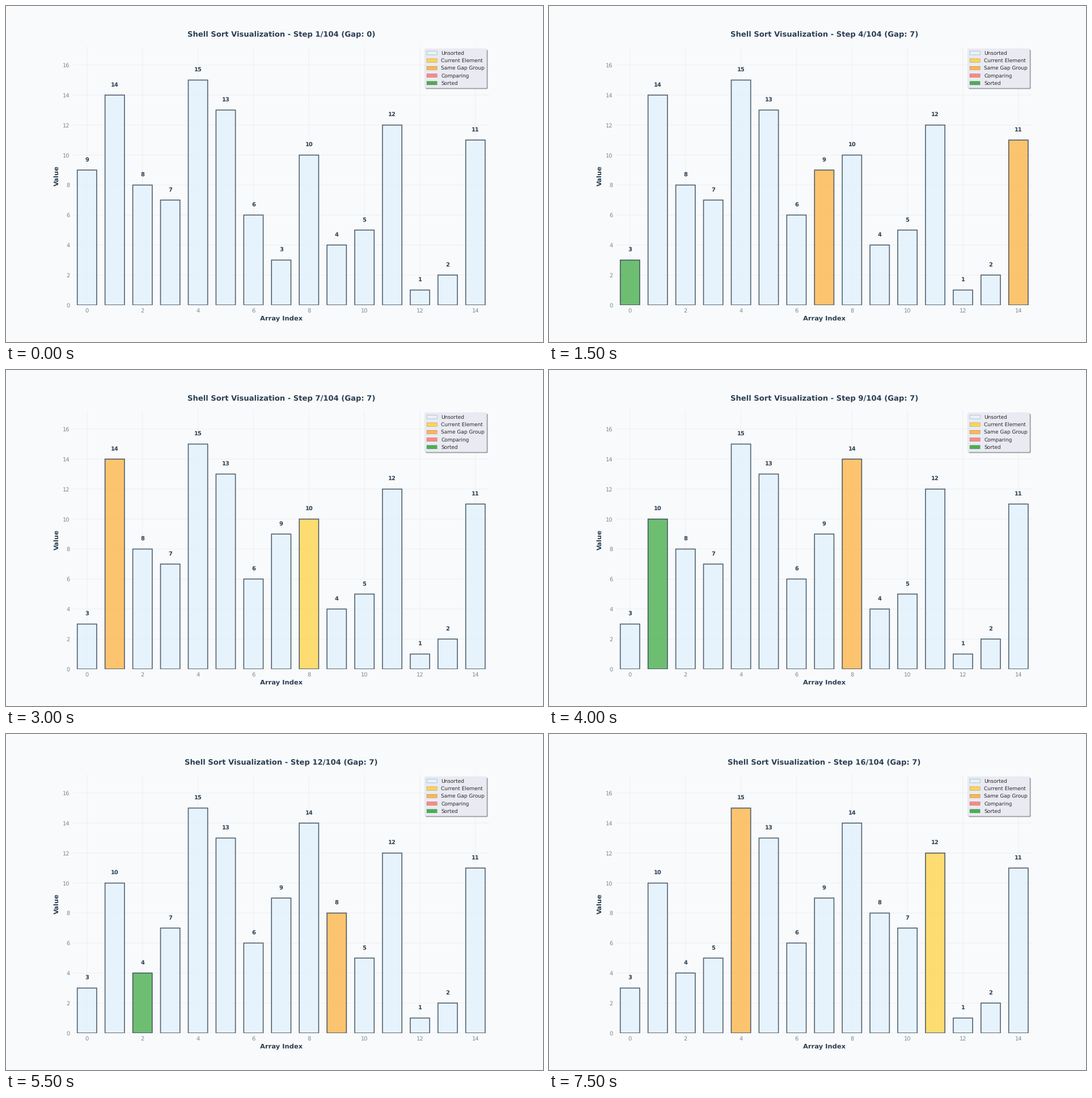
A matplotlib script that plays this animation: 947x592 px, repeating every 8000 ms.

```python
from itertools import islice

import matplotlib.pyplot as plt
from matplotlib.animation import FuncAnimation
from matplotlib.patches import Rectangle

DPI = 947 / 16
VALUES = [9, 14, 8, 7, 15, 13, 6, 3, 10, 4, 5, 12, 1, 2, 11]
FRAMES = 16
TOTAL = 104

BG, INK, MUTED = "#F8FAFC", "#2C3E50", "#7F8C8D"
COLORS = {
    "Unsorted": "#E3F2FD",
    "Current Element": "#FFD54F",
    "Same Gap Group": "#FFB74D",
    "Comparing": "#FF8A80",
    "Sorted": "#4CAF50",
}


def shell_sort(values):
    """Yield (array, gap, {index: state}) for every step, one gap group at a time."""
    arr = list(values)
    n = len(arr)
    yield arr[:], 0, {}
    gap = n // 2
    while gap:
        for start in range(gap):
            group = {k: "Same Gap Group" for k in range(start, n, gap)}
            for i in range(start + gap, n, gap):
                yield arr[:], gap, {**group, i: "Current Element"}
                item, j = arr[i], i
                while j >= gap and arr[j - gap] > item:
                    yield arr[:], gap, {**group, j: "Comparing", j - gap: "Comparing"}
                    arr[j], arr[j - gap] = arr[j - gap], item
                    j -= gap
                yield arr[:], gap, {**group, j: "Sorted"}
        gap //= 2


steps = list(islice(shell_sort(VALUES), FRAMES))

plt.rcParams.update({
    "font.family": "DejaVu Sans",
    "text.hinting": "none",
    "path.snap": False,
    "patch.linewidth": 0.3,
    "toolbar": "None",
})

fig, ax = plt.subplots(figsize=(16, 592 / DPI), dpi=DPI, facecolor=BG)
fig.subplots_adjust(left=0.125, right=0.9, bottom=0.11, top=0.88)
ax.set_facecolor(BG)
ax.set_axisbelow(True)
ax.grid(True, color="#E0E0E0", alpha=0.5, linewidth=1)
ax.spines[:].set_visible(False)
ax.tick_params(length=0, pad=7, labelsize=12, labelcolor=MUTED)
ax.set_xlabel("Array Index", fontsize=14, fontweight="bold", color=INK)
ax.set_ylabel("Value", fontsize=14, fontweight="bold", color=INK, labelpad=5.5)
title = ax.set_title("", fontsize=16, fontweight="bold", color=INK, pad=20)

bars = ax.bar(range(len(VALUES)), VALUES, width=0.7, alpha=0.8,
              edgecolor=INK, linewidth=2)
labels = [ax.text(i, 0, "", ha="center", va="bottom", fontsize=12,
                  fontweight="bold", color=INK) for i in range(len(VALUES))]
ax.set_xlim(-0.5, len(VALUES) - 0.5)
ax.set_ylim(0, max(VALUES) * 1.15)

keys = [Rectangle((0, 0), 1, 1, facecolor=c, edgecolor=INK)
        for c in COLORS.values()]
ax.legend(keys, list(COLORS), loc="upper right", fontsize=11, shadow=True,
          fancybox=True, framealpha=1, facecolor="#EAEAF2",
          edgecolor="0.8", labelcolor="0.15")


def draw(frame):
    arr, gap, states = steps[frame]
    title.set_text(f"Shell Sort Visualization - Step {frame + 1}/{TOTAL} (Gap: {gap})")
    for i, (bar, label, value) in enumerate(zip(bars, labels, arr)):
        bar.set_height(value)
        bar.set_facecolor(COLORS[states.get(i, "Unsorted")])
        label.set_text(str(value))
        label.set_y(value + 0.5)
    return [title, *bars, *labels]


anim = FuncAnimation(fig, draw, frames=FRAMES, init_func=lambda: draw(0),
                     interval=500, repeat=True, repeat_delay=0, blit=False)
plt.show()
```
